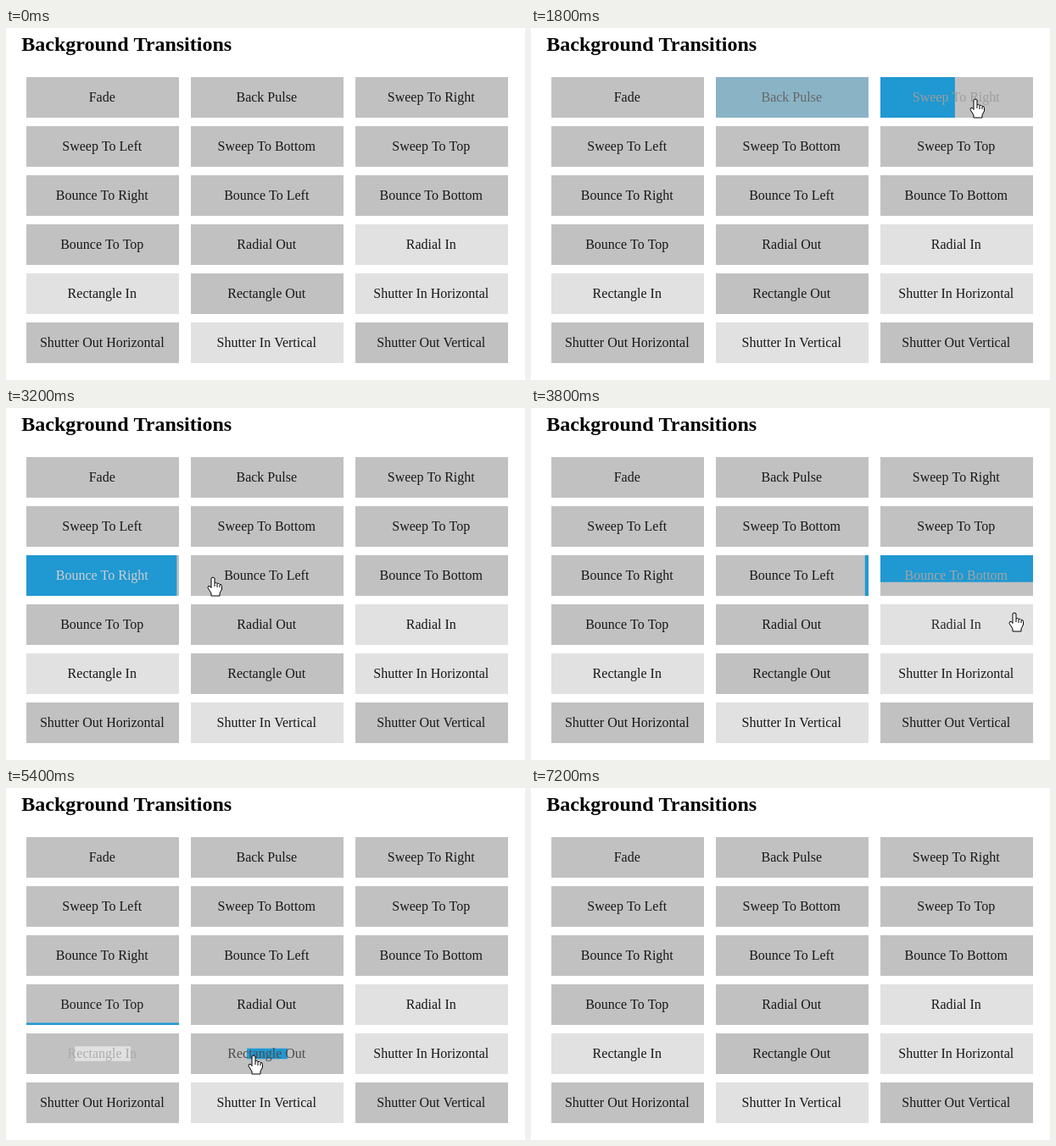
Recreate the animation shown at these times as an HTML page with a canvas. Size 612x416 px, loop 7.5 s.

```html
<!DOCTYPE html>
<html lang="en">
<head>
<meta charset="utf-8">
<title>Background Transitions</title>
<style>
  html, body { margin: 0; width: 100%; height: 100%; overflow: hidden; background: #fff; }
  canvas { display: block; }
</style>
</head>
<body>
<canvas width="612" height="416"></canvas>
<script>
const ctx = document.querySelector('canvas').getContext('2d');
const LOOP = 7500, STEP = 100;
const WIDTH = 180, HEIGHT = 48, COLUMN = 194, ROW = 58;
const GREY = [193, 193, 193], LIGHT = [225, 225, 225], BLUE = [32, 152, 209];
const INK = [24, 24, 24], WHITE = [255, 255, 255];

const rgb = color => `rgb(${color.map(Math.round)})`;
const mix = (a, b, p) => a.map((v, i) => v + (b[i] - v) * p);

function bezier(x1, y1, x2, y2) {
  const at = (a, b, s) => 3 * a * s * (1 - s) ** 2 + 3 * b * s * s * (1 - s) + s ** 3;
  return x => {
    if (x <= 0) return 0;
    if (x >= 1) return 1;
    let low = 0, high = 1;
    for (let i = 0; i < 24; i++) {
      const mid = (low + high) / 2;
      if (at(x1, x2, mid) < x) low = mid; else high = mid;
    }
    return at(y1, y2, low);
  };
}
const ease = bezier(0.25, 0.1, 0.25, 1);
const easeOut = bezier(0, 0, 0.58, 1);
const bounce = bezier(0.52, 1.64, 0.37, 0.66);

// ax / ay: the axis that scales and the anchor it scales from.
const slow = { duration: 500, enter: bounce };
const center = { ax: 0.5, ay: 0.5 };
const cells = [
  { name: 'Fade', fade: true },
  { name: 'Back Pulse', fade: true, duration: 500 },
  { name: 'Sweep To Right', ax: 0 },
  { name: 'Sweep To Left', ax: 1 },
  { name: 'Sweep To Bottom', ay: 0 },
  { name: 'Sweep To Top', ay: 1 },
  { name: 'Bounce To Right', ax: 0, ...slow },
  { name: 'Bounce To Left', ax: 1, ...slow },
  { name: 'Bounce To Bottom', ay: 0, ...slow },
  { name: 'Bounce To Top', ay: 1, ...slow },
  { name: 'Radial Out', ...center, round: true },
  { name: 'Radial In', ...center, round: true, inward: true },
  { name: 'Rectangle In', ...center, inward: true },
  { name: 'Rectangle Out', ...center },
  { name: 'Shutter In Horizontal', ax: 0.5, inward: true },
  { name: 'Shutter Out Horizontal', ax: 0.5 },
  { name: 'Shutter In Vertical', ay: 0.5, inward: true },
  { name: 'Shutter Out Vertical', ay: 0.5 },
].map((cell, i) => ({
  duration: 300, enter: easeOut, ...cell,
  x: 24 + COLUMN * (i % 3), y: 58 + ROW * Math.floor(i / 3),
}));

// The pointer snakes through the rows; each row has a start and an end time.
const LEFT = 70, RIGHT = 570, POINTER_LEAD = 40;
const rowTimes = [
  [1272, 1897], [2270, 2825], [3066, 3566], [3940, 4940], [5165, 5785], [5878, 6808],
];
const route = [
  [800, 20, 44],
  ...rowTimes.flatMap(([start, end], row) => {
    const [from, to] = row % 2 ? [RIGHT, LEFT] : [LEFT, RIGHT];
    const y = 84 + ROW * row;
    return [[start, from, y], [end, to, y]];
  }),
  [6880, LEFT, 432],
];

function pointerAt(time) {
  const next = route.findIndex(point => point[0] > time);
  if (next < 1) return null;
  const from = route[next - 1], to = route[next];
  return mix(from, to, (time - from[0]) / (to[0] - from[0])).slice(1);
}

const cellAt = ([x, y]) =>
  cells.find(c => x >= c.x && x < c.x + WIDTH && y >= c.y && y < c.y + HEIGHT);

// Every cell is crossed once, so its hover is one span of time.
for (let time = 0; time < LOOP; time++) {
  const point = pointerAt(time);
  const cell = point && cellAt(point);
  if (!cell) continue;
  cell.start ??= time;
  cell.end = time + 1;
}

const arrow = new Path2D('M0 0V16L4 12.5L6.5 18L9 17L6.5 11.5H11.5Z');
const hand = new Path2D('M-2 1Q0 -1 2 1V7Q4 5.5 5 7.5Q7 6.5 8 8.5Q10.5 8 10.5 10.5' +
  'V14L8 19V22H-2V19L-6 12.5Q-6 9.5 -3.5 10.5L-2 12.5Z');
const knuckles = new Path2D('M2 7V11M5 8V12M8 9V12');

// Hover progress; leaving early shortens the way back, as in CSS transitions.
function progress(time, { start, end, duration }, enter, leave) {
  const reached = enter((Math.min(time, end) - start) / duration);
  if (time <= end || !reached) return reached;
  return reached * (1 - leave((time - end) / (duration * reached)));
}

function drawShape(cell, time) {
  const { x, y, ax, ay } = cell;
  const p = progress(time, cell, cell.enter, easeOut);
  const scale = (cell.inward ? 1 - p : p) * (cell.round ? 2 : 1);
  const w = ax === undefined ? WIDTH : WIDTH * scale;
  const h = ay === undefined ? HEIGHT : HEIGHT * scale;
  ctx.save();
  ctx.beginPath();
  ctx.rect(x, y, WIDTH, HEIGHT);
  ctx.clip();
  ctx.beginPath();
  if (cell.round) ctx.ellipse(x + WIDTH / 2, y + HEIGHT / 2, w / 2, h / 2, 0, 0, 2 * Math.PI);
  else ctx.rect(x + (WIDTH - w) * (ax ?? 0), y + (HEIGHT - h) * (ay ?? 0), w, h);
  ctx.fillStyle = rgb(cell.inward ? LIGHT : BLUE);
  ctx.fill();
  ctx.restore();
}

function drawCell(cell, time) {
  const tint = progress(time, cell, ease, ease);
  ctx.fillStyle = rgb(cell.fade ? mix(GREY, BLUE, tint) : GREY);
  ctx.fillRect(cell.x, cell.y, WIDTH, HEIGHT);
  if (!cell.fade) drawShape(cell, time);
  ctx.fillStyle = rgb(mix(INK, WHITE, tint));
  ctx.fillText(cell.name, cell.x + WIDTH / 2 - 0.75, cell.y + 29);
}

function drawPointer(time) {
  const point = time >= route[0][0] && pointerAt(time + POINTER_LEAD);
  if (!point) return;
  const over = cellAt(point);
  const shape = over ? hand : arrow;
  ctx.save();
  ctx.translate(...point.map(Math.round));
  ctx.fillStyle = '#fff';
  ctx.strokeStyle = '#000';
  ctx.fill(shape);
  ctx.stroke(shape);
  if (over) ctx.stroke(knuckles);
  ctx.restore();
}

function draw(now) {
  const time = Math.floor((now % LOOP) / STEP) * STEP;
  ctx.fillStyle = '#fff';
  ctx.fillRect(0, 0, 612, 416);
  ctx.fillStyle = '#000';
  ctx.textAlign = 'left';
  ctx.font = 'bold 24px "Liberation Serif", serif';
  ctx.fillText('Background Transitions', 18.25, 27);
  ctx.textAlign = 'center';
  ctx.font = '16px "Liberation Serif", serif';
  cells.forEach(cell => drawCell(cell, time));
  drawPointer(time);
}

const begin = performance.now();
function tick() {
  draw(performance.now() - begin);
  requestAnimationFrame(tick);
}
tick();
</script>
</body>
</html>
```
